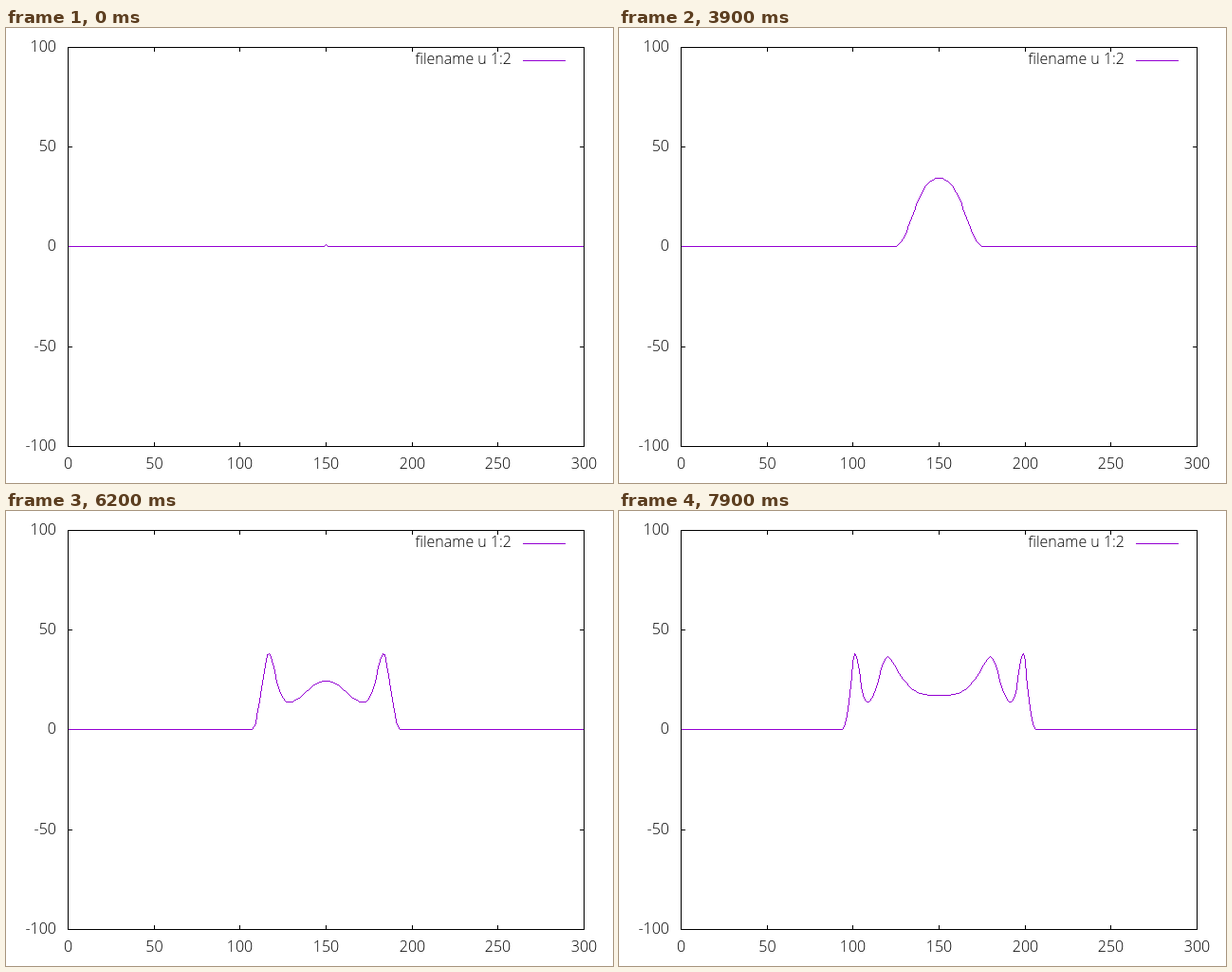
An HTML page with a canvas for the animation above (8000 ms loop, 640 by 480 pixels).

```html
<!DOCTYPE html>
<html lang="en">
<head>
<meta charset="utf-8">
<title>Wave plot</title>
<style>
  html, body { margin: 0; width: 100%; height: 100%; overflow: hidden; background: #fff; }
  canvas, svg { position: absolute; left: 0; top: 0; }
  text { font: 300 16px "Open Sans", "Noto Sans", sans-serif; fill: #000; }
  .end { text-anchor: end; }
  .mid { text-anchor: middle; }
</style>
</head>
<body>
<canvas width="640" height="480"></canvas>
<svg width="640" height="480"><text class="end" x="533" y="38">filename u 1:2</text></svg>
<script>
const LEFT = 65, RIGHT = 609, TOP = 20, BOTTOM = 441;
const PURPLE = '#9400d3';
const LOOP = 8000, STEP = 100, CENTER = 150;
const SLOWNESS = 1.375; // steps the front needs per cell

// Crests and troughs of the wave; bend skews the cosine ease that leads to each
const TURNS = [
  { at: 0, height: 0 },
  { at: 41.8, height: 38.3, bend: 3.3 },
  { at: 54, height: 14, bend: .9 },
  { at: 67.8, height: 36.8, bend: 1.37 },
  { at: 81, height: 16.5, bend: .75 }
];

const ctx = document.querySelector('canvas').getContext('2d');
const svg = document.querySelector('svg');
const px = x => LEFT + Math.round(x * (RIGHT - LEFT) / 300);
const py = v => BOTTOM - Math.floor((v + 100) * (BOTTOM - TOP) / 200 + .5);

function label(value, cls, x, y) {
  const el = document.createElementNS(svg.namespaceURI, 'text');
  el.setAttribute('class', cls);
  el.setAttribute('x', x);
  el.setAttribute('y', y);
  el.textContent = value;
  svg.append(el);
}
for (let x = 0; x <= 300; x += 50) label(x, 'mid', px(x) + .5, 465);
for (let v = -100; v <= 100; v += 50) label(v, 'end', 53, py(v) + 5);

// Wave height at a given age
function profile(age) {
  const i = TURNS.findIndex(turn => turn.at > age);
  const a = TURNS[i - 1], b = TURNS[i];
  const u = ((age - a.at) / (b.at - a.at)) ** b.bend;
  return a.height + (b.height - a.height) * (1 - Math.cos(Math.PI * u)) / 2;
}

// The age shrinks hyperbolically with distance; faint ripples come before the swell
function height(cell, t) {
  const d = Math.abs(cell - CENTER);
  const v = profile(Math.sqrt(Math.max(0, t * t - (SLOWNESS * d) ** 2)));
  const isRipple = t < 20 && d < .6 * t + .5 && Math.round(Math.round(d * 3 / 8) * 8 / 3) === d;
  return isRipple ? Math.max(v, t < 2 ? 1 : .5) : v;
}

const bar = (x, y, w, h) => ctx.fillRect(x, y, w, h);

// Unsmoothed one-pixel line
function line(x0, y0, x1, y1) {
  const n = Math.max(Math.abs(x1 - x0), Math.abs(y1 - y0), 1);
  for (let i = 0; i <= n; i++) {
    bar(Math.round(x0 + (x1 - x0) * i / n), Math.round(y0 + (y1 - y0) * i / n), 1, 1);
  }
}

function ticks() {
  for (let x = 50; x < 300; x += 50) {
    bar(px(x), TOP, 1, 5);
    bar(px(x), BOTTOM - 4, 1, 5);
  }
  for (let v = -50; v <= 50; v += 50) {
    bar(LEFT, py(v), 5, 1);
    bar(RIGHT - 4, py(v), 5, 1);
  }
}

function border() {
  for (const y of [TOP, BOTTOM]) bar(LEFT, y, RIGHT - LEFT + 1, 1);
  for (const x of [LEFT, RIGHT]) bar(x, TOP, 1, BOTTOM - TOP + 1);
}

function draw(t) {
  ctx.clearRect(0, 0, 640, 480);
  ctx.fillStyle = '#000';
  ticks();
  ctx.fillStyle = PURPLE;
  bar(545, 34, 45, 1);
  for (let c = 0; c < 300; c++) {
    line(px(c), py(height(c, t)), px(c + 1), py(height(c + 1, t)));
  }
  ctx.fillStyle = '#000';
  border();
}

let shown = -1;
const start = performance.now();
function tick() {
  const step = Math.floor((performance.now() - start) % LOOP / STEP);
  const t = step < 2 ? 0 : step;
  if (t !== shown) draw(shown = t);
  requestAnimationFrame(tick);
}
tick();
</script>
</body>
</html>
```
